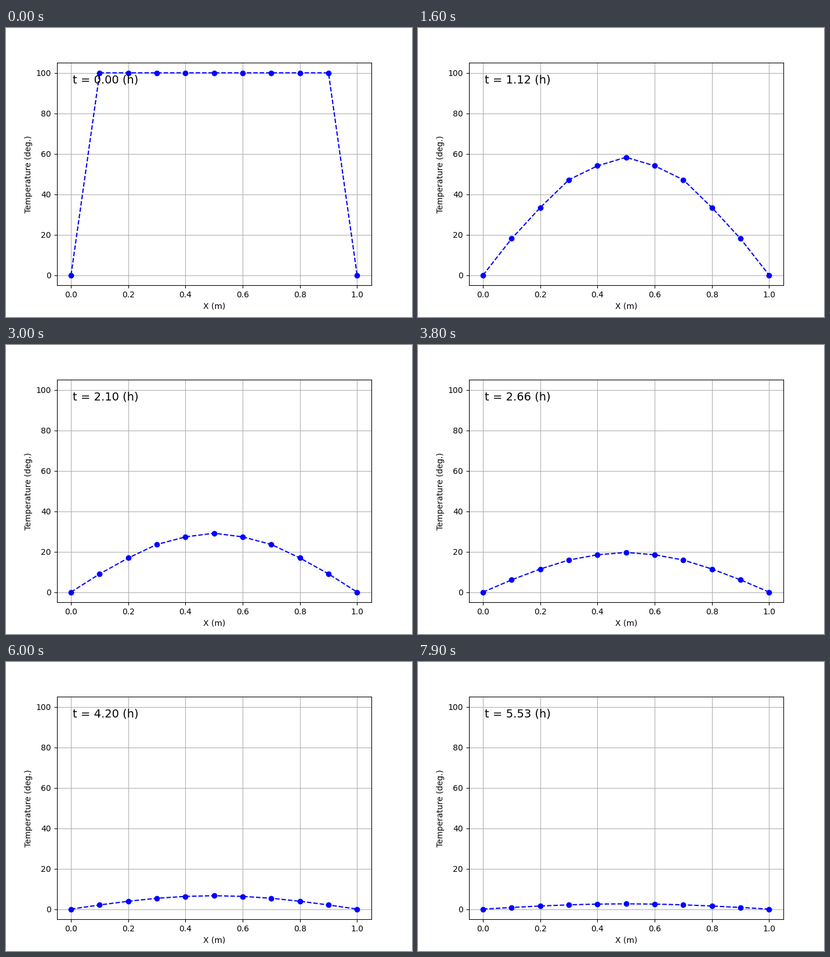
A matplotlib script for the animation above (8 s loop, 700 by 500 pixels).

```python
import numpy as np
import matplotlib.pyplot as plt
from matplotlib.animation import FuncAnimation

STEPS = 80
DT = 0.07           # time step (h)
DX = 0.1            # grid spacing (m)
DIFFUSIVITY = 0.07  # m^2/h


def solve_heat():
    """Explicit finite differences with both ends held at zero."""
    r = DIFFUSIVITY * DT / DX**2
    temp = np.full(11, 100.0)
    temp[[0, -1]] = 0.0
    history = [temp]
    for _ in range(STEPS - 1):
        temp = temp.copy()
        temp[1:-1] += r * np.diff(temp, 2)
        history.append(temp)
    return history


x = np.linspace(0, 1, 11)
history = solve_heat()

plt.rcParams["font.family"] = "DejaVu Sans"
fig, ax = plt.subplots(figsize=(7, 5), dpi=100)
fig.subplots_adjust(left=0.125, right=0.9, bottom=0.11, top=0.88)
ax.set(xlim=(-0.05, 1.05), ylim=(-5, 105),
       xlabel="X (m)", ylabel="Temperature (deg.)")
ax.grid(True)

line, = ax.plot(x, history[0], "o--", color="blue")
label = ax.text(0.05, 0.909, "", fontsize=14, transform=ax.transAxes)


def update(step):
    line.set_ydata(history[step])
    label.set_text(f"t = {step * DT:.2f} (h)")
    return line, label


anim = FuncAnimation(fig, update, frames=STEPS, interval=100,
                     repeat=True, repeat_delay=0)
plt.show()
```
